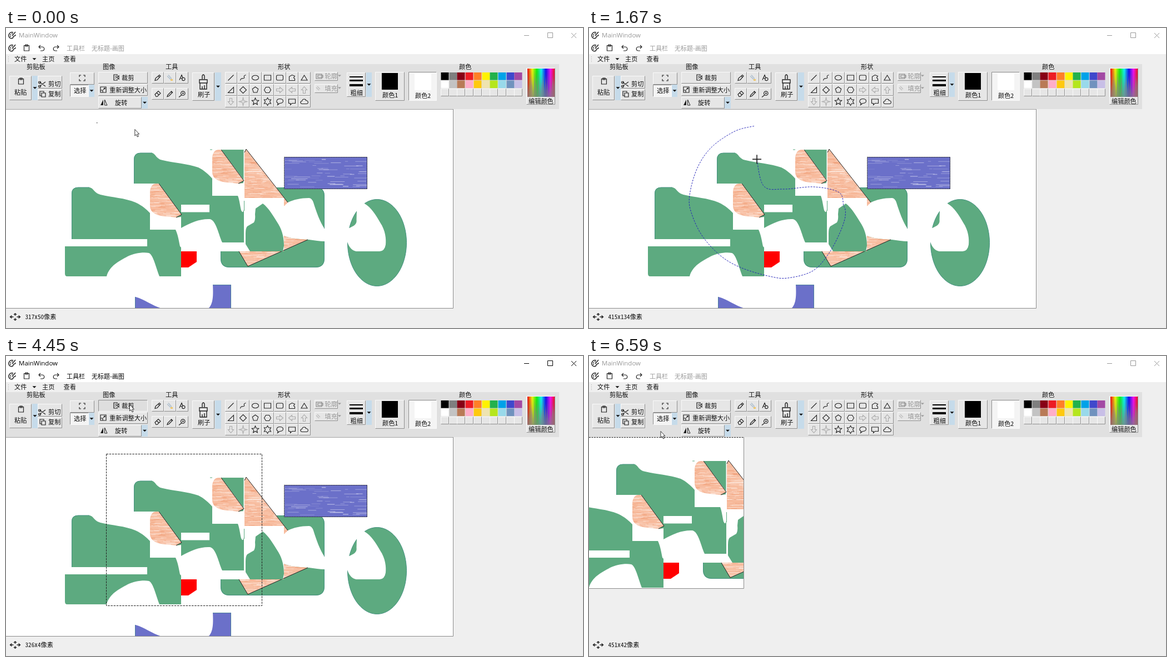
Recreate the animation shown at these times as an HTML page with a canvas. Size 1038x540 px, loop 6.92 s.

```html
<!DOCTYPE html>
<html lang="zh-CN">
<head>
<meta charset="utf-8">
<title>MainWindow</title>
<style>
html, body { margin: 0; width: 100%; height: 100%; overflow: hidden; background: #efefef; }
canvas { display: block; width: 1038px; height: 540px; }
</style>
</head>
<body>
<canvas id="stage" width="1038" height="540"></canvas>
<script>
const W = 1038, H = 540, LOOP = 6920;
const UI_FONT = '11.2px "Noto Sans Mono CJK SC", "Noto Sans CJK SC", monospace';
const BAR_FONT = '11px "Noto Sans CJK SC", "Noto Sans", sans-serif';
const TITLE_FONT = '11.5px "Open Sans", "Noto Sans", sans-serif';
const GREEN = '#5daa80', EDGE = '#43917f', BLUE = '#6b70c9', ORANGE = '#f7b797';
const stage = document.getElementById('stage').getContext('2d');
let g = stage;

function layer(draw) {
  const c = document.createElement('canvas');
  c.width = W; c.height = H;
  g = c.getContext('2d');
  draw();
  g = stage;
  return c;
}
function box(x, y, w, h, color) { g.fillStyle = color; g.fillRect(x, y, w, h); }
function fill(d, color) { g.fillStyle = color; g.fill(new Path2D(d)); }
function line(d, color = '#222', width = 1, dash = []) {
  g.strokeStyle = color; g.lineWidth = width; g.setLineDash(dash);
  g.stroke(new Path2D(d)); g.setLineDash([]);
}
function text(s, x, y, color = '#111', font = UI_FONT) {
  g.font = font; g.fillStyle = color; g.textBaseline = 'middle';
  g.fillText(s, x, y);
}
function at(x, y, draw) { g.save(); g.translate(x, y); draw(); g.restore(); }
function random(seed) {
  return () => (seed = (seed * 16807) % 2147483647) / 2147483647;
}

// Painted artwork
function streaks(d, color, [x, y, w, h], count, long, seed) {
  const rnd = random(seed);
  g.save();
  g.clip(new Path2D(d));
  for (let i = 0; i < count; i++) {
    g.globalAlpha = .12 + rnd() * .4;
    box(x - 10 + rnd() * w, y + rnd() * h, 5 + rnd() * long, .5 + rnd(), color);
  }
  g.restore();
}
function crayon(d, bounds, seed) {
  const [x, y, w, h] = bounds;
  fill(d, ORANGE);
  g.save();
  g.clip(new Path2D(d));
  for (let i = 0; i < h; i += 3) box(x, y + i, w, 1, 'rgba(255,255,255,.22)');
  g.restore();
  streaks(d, '#fff', bounds, w * h / 32, 24, seed);
  streaks(d, '#ec936a', bounds, w * h / 55, 20, seed + 9);
}
function crayonLeaf() {
  crayon('M275 280 L315 335 V340 L306 341 C288 339 278 339 269 335 Q259 330 259 320 V295 Q260 281 270 280 Z', [259, 280, 57, 62], 31);
  fill('M306 341 L315 336 V340 Z', GREEN);
  line('M275 280 L316 336 L306 341');
}
function drawArt() {
  box(0, 146, W, 359, '#fff');
  fill('M230 280 V237 Q230 225 242 225 H263 C269 226 270 236 282 238 C303 243 326 244 346 251 C356 256 364 263 371 271 V302 H417 C420 309 421 320 423 328 Q426 335 428 327 V386 H389 C383 374 378 346 367 344 C350 343 332 350 315 360 V335 L275 280 Z', GREEN);
  line('M230.5 280 V237 Q230.5 225 242 225 H263', EDGE);
  box(315, 318, 51, 13.5, '#fff');
  fill('M118 380 V298 Q118 287 130 287 H150 C158 288 158 297 170 300 C191 305 214 306 233 314 C246 320 253 327 259 333 V363 H305 C309 371 311 383 313 393 L315 395 V447 H276 C270 432 265 408 257 405 C245 403 230 406 219 411 C203 420 186 428 181 447 H110 Q106 447 106 442 V393 H254 V380 Z', GREEN);
  line('M118.5 380 V298 Q118.5 287 130 287 H150', EDGE);
  crayonLeaf();
  box(387, 219, 40.5, 55, GREEN);
  fill('M387 219 L428 274 H387 Z', '#fff');
  at(112, -61, crayonLeaf);
  box(367, 218.5, 4, 1, GREEN);
  box(428, 311, 1, 18, GREEN);

  fill('M486 287 H558 Q573 287 573 302 V361 C565 350 558 330 553 314 Q550 306 545 306 C530 306 517 309 507 314 Z', GREEN);
  fill('M386 402 H500 V374 C510 379 530 380 545 381 C555 382 565 384 573 384 V415 Q573 431 557 431 H402 Q386 431 386 415 Z', GREEN);
  line('M386.5 402 V415 Q386.5 430.5 402 430.5 H557 Q572.5 430.5 572.5 415 V384 M572.5 361 V302 Q572.5 287.5 558 287.5 H488', EDGE);
  crayon('M429 224 L432 218 L507 314 L500 321 V306 H429 Z', [429, 218, 78, 103], 67);
  line('M429 224 L432 218 L507 314');
  crayon('M419 402 H500 V374 C510 379 530 380 543 381 L435 429 Z', [419, 374, 125, 56], 85);
  line('M419 402 L435 429 L543 381');
  fill('M462 316 C472 323 482 340 490 353 C498 366 500 380 500 392 L498 402 H439 L431 389 V370 Q431 360 434 357 L446 350 Q449 345 448 335 L449 325 Q456 320 462 316 Z', GREEN);
  fill('M315 402 H343 V421 L328 431 H315 Z', '#f00');

  g.beginPath();
  g.ellipse(667.5, 386.5, 53, 78, 0, 0, 7);
  g.fillStyle = GREEN; g.fill();
  g.strokeStyle = EDGE; g.lineWidth = 1; g.stroke();
  fill('M645 316 C657 323 665 336 673 350 C683 365 684 380 683 390 Q681 402 672 402 H630 Q619 400 614 385 L612 363 C622 357 632 356 630.5 345 L631 329 L638 306 Z', '#fff');

  const slab = 'M501 232 H650 V290 H501 Z';
  fill(slab, BLUE);
  streaks(slab, '#fff', [501, 234, 145, 52], 55, 26, 23);
  line('M500.5 232.5 H649.5 V289.5 H500.5 Z', '#222', 1, [2, 1]);
  fill('M233 484 C250 489 262 499 280 505 H233 Z', BLUE);
  fill('M372 462 H405 V505 H364 C373 497 373 480 372 462 Z', BLUE);
  line('M232.5 484 V505 M372 462.5 H404.5 V505', '#4d7f9c');
}

// Window furniture
function button(x, y, w, h, sunken = false, face = '#e6e6e6') {
  box(x, y, w, h, face);
  const light = '#fafafa', dark = '#8f8f8f';
  line(`M${x + .5} ${y + h - .5} V${y + .5} H${x + w - .5}`, sunken ? dark : light);
  line(`M${x + .5} ${y + h - .5} H${x + w - .5} V${y + .5}`, sunken ? light : dark);
}
function arrowDown(x, y, color = '#111', r = 3.5) {
  fill(`M${x - r} ${y - r / 2} h${2 * r} l${-r} ${r} Z`, color);
}
function dropdown(x, y, w, h) {
  box(x, y, w, h, '#c6dbea');
  arrowDown(x + w / 2, y + h / 2);
}
function icon(x, y, d, color = '#222', width = 1.2) {
  at(x, y, () => line(d, color, width));
}
function polygon(points, radius, inner = radius) {
  const n = inner === radius ? points : points * 2;
  return Array.from({ length: n }, (_, i) => {
    const a = i * 2 * Math.PI / n - Math.PI / 2, r = i % 2 ? inner : radius;
    return (i ? 'L' : 'M') + r * Math.cos(a) + ' ' + r * Math.sin(a);
  }).join('') + 'Z';
}
const CLIP = 'M-4.5 -4.5 H4.5 V5 H-4.5 Z M-2 -6 H2 V-3 H-2 Z';
const PENCIL = 'M-5 5 L-4 1 L3 -5 L5 -3 L-1 4 Z M1 -3 L3 -1';
const ELLIPSE = 'M-6 0 A6 4.3 0 0 1 6 0 A6 4.3 0 0 1 -6 0 Z';
const ARROW = 'M-6 -2 H0 V-5 L6 0 L0 5 V2 H-6 Z';

function paletteIcon(x, y) {
  icon(x, y, 'M2 -5 C-4 -7 -8 -1 -5 4 C-2 7 2 6 2 3 C2 0 6 3 6 -1 M0 1 L6 -6', '#222', 1.5);
  for (const [px, py] of [[-3, -1], [0, -3], [-3, 2]]) box(x + px - .8, y + py - .8, 1.7, 1.7, '#222');
}
function drawShapes() {
  const shapes = [
    'M-5 5 L5 -5', 'M-5 5 C-4 0 -2 2 1 1 C5 0 -2 -3 5 -5', ELLIPSE, 'M-6 -4.5 H6 V4.5 H-6 Z',
    'M-4 -4.5 H4 Q6 -4.5 6 -2 V2 Q6 4.5 4 4.5 H-4 Q-6 4.5 -6 2 V-2 Q-6 -4.5 -4 -4.5 Z',
    'M-5 5 V-2 L0 -5 L5 -3 L3 0 L5 2 V5 Z', 'M0 -4.5 L5.5 4.5 H-5.5 Z',
    'M-5 5 H5 V-5 Z', polygon(4, 6), polygon(5, 5.5), 'M-6 0 L-3 -5 H3 L6 0 L3 5 H-3 Z', ARROW, ARROW, ARROW,
    ARROW, polygon(4, 7, 2), polygon(5, 6.5, 3), polygon(6, 7, 4),
    'M-3 3 C-8 0 -5 -5 0 -5 C8 -5 8 3 0 3 L-4 6 Z', 'M-6 -4.5 H6 V3 H0 L-3 6 V3 H-6 Z',
    'M-4 4 C-8 3 -7 -1 -4 -1 C-3 -6 3 -5 3 -2 C8 -2 8 4 4 4 Z'
  ];
  const turns = { 12: Math.PI, 13: -Math.PI / 2, 14: Math.PI / 2 };
  shapes.forEach((d, i) => {
    const x = 394 + i % 7 * 22, y = 79 + Math.floor(i / 7) * 21.7;
    button(x, Math.round(y), 22, 21);
    at(x + 10.5, Math.round(y) + 10.5, () => {
      g.rotate(turns[i] || 0);
      line(d, i > 10 && i < 16 ? '#aaa' : '#222', 1.1);
    });
  });
}
function drawColors() {
  const rows = [
    '000000 7f7f7f 880015 ed1c24 ff7f27 fff200 22b14c 00a2e8 3f48cc a349a4',
    'ffffff c3c3c3 b97a57 ffaec9 ffc90e efe4b0 b5e61d 99d9ea 7092be c8bfe7'
  ].map(row => row.split(' '));
  for (let i = 0; i < 10; i++) {
    const x = Math.round(782 + i * 14.7);
    rows.forEach((row, r) => box(x + .5, 80 + r * 14.5, 14, 13.7, '#' + row[i]));
    button(x, 109, 15, 14);
  }
  button(664, 79, 53, 52);
  box(676, 81, 29, 30, '#000');
  text('颜色1', 677, 121);
  button(724, 79, 51, 52, true, '#f4f4f4');
  box(735, 82, 30, 30, '#fff');
  text('颜色2', 736, 121.5);

  button(936, 72, 52, 66);
  const rnd = random(5);
  for (let x = 0; x < 49; x++) {
    const hue = x / 49 * 360, drop = .1 + rnd() * .6, fade = g.createLinearGradient(0, 73, 0, 124);
    fade.addColorStop(0, `hsl(${hue},90%,50%)`);
    fade.addColorStop(drop, `hsl(${hue},75%,48%)`);
    fade.addColorStop(Math.min(1, drop + .3), `hsl(${hue},30%,50%)`);
    fade.addColorStop(1, `hsl(${hue},18%,50%)`);
    box(938 + x, 73, 1, 51, fade);
  }
  text('编辑颜色', 940, 131.5);
}
function drawChrome() {
  box(0, 0, W, H, '#efefef');
  box(0, 0, W, 47, '#fff');
  box(0, 65, 995, 81, '#e0e0e0');
  paletteIcon(11, 13);
  paletteIcon(11, 36);
  icon(37, 36, CLIP);
  const undo = 'M-2 -5 L-5 -2 L-2 1 M-5 -2 H1 C6 -2 6 5 1 5 H-2';
  icon(64, 36, undo);
  at(90, 36, () => { g.scale(-1, 1); line(undo, '#222', 1.2); });
  line('M4.5 51 V62', '#aaa', 1, [1, 2]);
  text('文件', 15, 56); arrowDown(51, 56);
  text('主页', 65, 56); text('查看', 103.5, 56);
  for (const [label, x] of [['剪贴板', 37], ['图像', 174], ['工具', 287], ['形状', 489], ['颜色', 815]]) text(label, x, 70);

  button(6, 86, 40, 44); icon(27, 96, CLIP); text('粘贴', 15, 116);
  dropdown(47, 86, 10, 44);
  button(57, 86, 44, 23); text('剪切', 76, 101);
  icon(66, 101, 'M-6 -4 L5 4 M-6 4 L5 -4 M-6 -5 a2 2 0 1 0 1 0 M-6 2 a2 2 0 1 0 1 0');
  button(57, 110, 44, 20); text('复制', 76, 119);
  icon(66, 119, 'M-2 -2 H5 V5 H-2 Z M-2 3 H-5 V-5 H2 V-2');

  button(115, 80, 44, 22);
  icon(137, 90, 'M-5 -2 V-5 H-2 M2 -5 H5 V-2 M5 2 V5 H2 M-2 5 H-5 V2');
  button(115, 102, 34, 22, true, '#f4f4f4'); text('选择', 122, 113);
  dropdown(149, 102, 10, 22);
  button(166, 101, 89, 21); text('重新调整大小', 186, 112);
  icon(175, 111, 'M-5 -5 H5 V5 H-5 Z M-5 1 H-1 V5 M0 0 L3 -3 M1 -3 H3 V-1');
  button(166, 124, 78, 21); text('旋转', 196, 134.5);
  fill('M175 129 V139 H170 Z', '#222'); icon(179, 134, 'M-1.5 -5 V5 H3 Z', '#222', 1);
  dropdown(244, 124, 11, 21);

  const tools = [PENCIL, 'M-3 -5 L3 2 M-5 -3 L1 3', 'M-5 4 L-1 -5 L1 0 M-4 1 H0 M5 2.5 a2.7 2.7 0 1 0 -5.4 0 a2.7 2.7 0 1 0 5.4 0',
    'M-5 1 L1 -5 L5 -1 L-1 5 H-3 Z M-2 -2 L2 2', 'M-5 5 L-4 2 L2 -4 L4 -2 L-2 4 Z M2 -5 L5 -2', 'M5 -1 a3.7 3.7 0 1 0 -7.4 0 a3.7 3.7 0 1 0 7.4 0 M-1 2 L-6 6 M0 -1 H3 M1.4 -2.5 V.5'];
  tools.forEach((d, i) => {
    const x = 262 + i % 3 * 22, y = i < 3 ? 79 : 108;
    button(x, y, 22, 21);
    icon(x + 11, y + 10.5, d, i === 1 ? '#a9bccd' : '#222');
  });
  box(296, 92, 4, 3, '#f0c66a');

  button(335, 80, 40, 51); text('刷子', 345, 120);
  icon(355, 97, 'M-2 -5 V-11 Q0 -15 2 -11 V-5 M-7 -4 H7 V2 H-7 Z M-6 2 V13 H6 V2 M-2 8 V13 M2 6 V13', '#222', 1.4);
  dropdown(376, 80, 11, 51);
  drawShapes();

  [['轮廓', 79], ['填充', 101]].forEach(([label, y], i) => {
    button(555, y, 42, 16);
    text(label, 573.5, y + 8, '#999');
    icon(563, y + 8, i ? 'M-3 -4 L2 1 M-5 -2 L0 3' : 'M-5 -4 H5 V4 H-5 Z M-2 -2 H7 V2 H-2 Z', i ? '#bbb' : '#888');
    arrowDown(600, y + 7, '#999', 3);
  });
  button(613, 80, 34, 44);
  box(618, 87, 24, 2, '#000'); box(618, 93, 24, 3, '#000'); box(618, 101, 24, 4, '#000');
  text('粗细', 619.5, 117);
  dropdown(648, 80, 10, 44);
  drawColors();

  icon(16.5, 520, 'M-8 0 H-3 M3 0 H8 M0 -6 V-2 M0 2 V6 M-6 -2.5 L-9 0 L-6 2.5 M6 -2.5 L9 0 L6 2.5 M-2.5 -4 L0 -6 L2.5 -4 M-2.5 4 L0 6 L2.5 4', '#222', 1.4);
}

// Pointer timeline: [ms, x, y]
const LASSO_START = 280, LASSO_END = 2140, SELECTED = 2340, PRESS = 4240, CROP = 4520;
const lasso = [
  [280, 297, 176.5], [400, 262, 186], [520, 220, 215], [600, 194, 254], [680, 180.5, 305], [740, 186, 338],
  [800, 205, 376], [860, 238, 411], [900, 275, 432], [950, 325, 447], [980, 358, 450], [1010, 403, 437],
  [1035, 432, 405], [1055, 452, 367], [1070, 461, 340], [1080, 460.6, 324.3], [1110, 458, 320],
  [1180, 450, 296], [1300, 405, 286], [1400, 350, 290], [1460, 314, 284], [1700, 301, 230],
  [1900, 297, 195], [2140, 297, 176.3]
];
const moves = [
  [0, 231.3, 182], [280, 297, 176.5], [2140, 297, 176.3], [2470, 297, 176.5], [2700, 275, 192], [2900, 250, 203],
  [3030, 240.1, 198.8], [3270, 240.1, 198.8], [3300, 241, 192], [3440, 238, 148.4], [3510, 222, 96],
  [3700, 222, 96], [3910, 222, 87], [4720, 222, 87], [5000, 285, 130], [5200, 335, 185], [5420, 349, 219],
  [5460, 333.1, 237.4], [5490, 329, 238], [5700, 280, 245], [5830, 249, 248], [5960, 249, 248],
  [6200, 225, 215], [6400, 185, 175], [6560, 149.2, 146.2], [6590, 128.5, 135], [LOOP, 128.5, 135]
];
const bursts = [0, 70, 830, 1530, 2340, 2540, 3300, 3770, 4520, 4790, 5490, 6030];

function pointer(t) {
  t = Math.max(0, t);
  const curved = t >= LASSO_START && t <= LASSO_END, keys = curved ? lasso : moves;
  let i = 0;
  while (i < keys.length - 2 && keys[i + 1][0] <= t) i++;
  const a = keys[i], b = keys[i + 1], u = Math.min(1, (t - a[0]) / (b[0] - a[0]));
  const before = keys[i - 1] || a, after = keys[i + 2] || b;
  return [1, 2].map(k => {
    if (!curved) return a[k] + (b[k] - a[k]) * u;
    const p = before[k], q = a[k], r = b[k], s = after[k];
    return q + u / 2 * (r - p + u * (2 * p - 5 * q + 4 * r - s + u * (3 * (q - r) + s - p)));
  });
}
function stepTime(t) {
  const start = bursts.filter(b => b <= t).pop();
  return start + Math.floor((t - start) / 70 + .001) * 70;
}
function statusText(t) {
  // The readout keeps the last position inside the drawing area.
  let s = Math.max(0, t - 30);
  while (s > 0 && pointer(s)[1] < 146) s -= 10;
  const [x, y] = pointer(s), cropped = s >= CROP;
  return `${Math.round((x + (cropped ? 180 : 0)) * 1.37)}x${Math.round((y - 145.5 + (cropped ? 30 : 0)) * 1.37)}像素`;
}

const art = layer(drawArt), chrome = layer(drawChrome);

function drawCanvas(t) {
  const cropped = t >= CROP, w = cropped ? 279 : 804, h = cropped ? 272 : 358;
  g.drawImage(art, cropped ? 181 : 0, cropped ? 176 : 146, w, h, 0, 146, w, h);
  const right = cropped ? w - .5 : w + .5;
  line(`M${right} 146 V${146.5 + h} H0`, '#8c8c8c');
  line(`M0 146.5 H${w}`, cropped ? '#222' : '#a5a5a5', 1, cropped ? [3, 1.5] : []);
  if (t < LASSO_START) box(163, 170, 1.3, 1.3, '#222');
  if (t >= LASSO_START && t < SELECTED) {
    let d = 'M297 176.5';
    for (let s = LASSO_START; s <= Math.min(t, LASSO_END); s += 5) d += 'L' + pointer(s).join(' ');
    line(d, '#2222b8', 1, [3, 2]);
  }
  if (t >= SELECTED && !cropped) line('M180.5 176.5 H460.5 V449.5 H180.5 Z', '#222', 1, [3.5, 1.7]);
}
function drawTitle(t) {
  const color = t >= PRESS && t < 4790 ? '#000' : '#999';
  const barColor = t >= PRESS && t < 4590 ? '#000' : '#999';
  text('MainWindow', 23, 13.5, color, TITLE_FONT);
  text('工具栏', 109, 37, barColor, BAR_FONT);
  text('无标题-画图', 154, 37, barColor, BAR_FONT);
  line('M932 13.5 H941 M974.5 8.5 H983.5 V17.5 H974.5 Z M1017 9 L1026 18 M1026 9 L1017 18', color);
}
function drawCropButton(pressed) {
  button(166, 79, 89, 21, pressed, pressed ? '#dedede' : '#e6e6e6');
  icon(198, 89, 'M2 -3 V-5 H-4 V5 H2 V3 M-2 -2 H1 M-2 1 H0 M5 -3 L1 0 L5 3 Z');
  text('裁剪', 208, 90);
}
function drawPointer(t) {
  const [x, y] = pointer(t);
  at(x, y, () => {
    if (t >= LASSO_START && t < SELECTED) return line('M-8 0 H8 M0 -8 V8', '#111', 1.5);
    const d = 'M.5 .5 V12 L3 9.6 L5 14 L7 13.1 L5.1 8.9 H8.4 Z';
    fill(d, '#fff');
    line(d, '#222', .9);
  });
}
function frame(now) {
  const t = stepTime(now % LOOP);
  g.drawImage(chrome, 0, 0);
  drawTitle(t);
  drawCropButton(t >= PRESS && t < CROP);
  drawCanvas(t);
  text(statusText(t), 34.5, 520);
  drawPointer(t);
  requestAnimationFrame(() => frame(performance.now() - began));
}
const began = performance.now();
frame(0);
</script>
</body>
</html>
```
